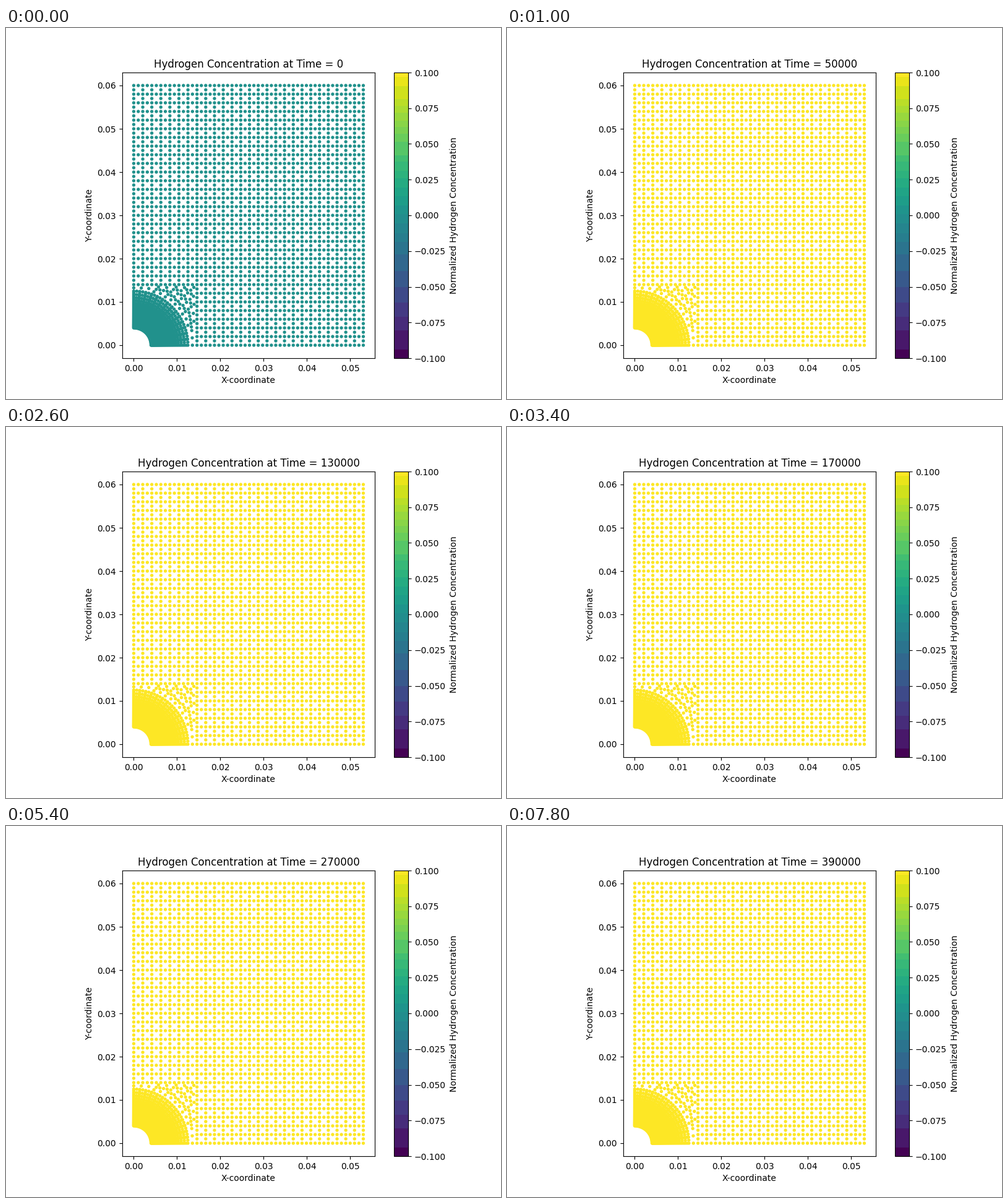
Recreate the animation shown at these times as a matplotlib script. Size 800 px wide and 600 px high, loop 8 s.

```python
import numpy as np
import matplotlib.pyplot as plt
from matplotlib.animation import FuncAnimation
from matplotlib.cm import ScalarMappable
from matplotlib.colors import ListedColormap, Normalize

FRAMES, INTERVAL, STEP = 40, 200, 10000
HOLE, RING = 0.004, 0.0125      # radii of the hole and of the fine mesh
BX, BY = 0.0146, 0.014          # block meshed around the hole
W, H = 0.053, 0.06              # whole plate
SIDE = 14                       # half-steps along each side of the block


def edge_nodes(ni, nj):
    """Half-step indices of 8-node quads (no centre nodes)."""
    i, j = np.meshgrid(np.arange(ni), np.arange(nj), indexing="ij")
    keep = (i % 2 == 0) | (j % 2 == 0)
    return i[keep], j[keep]


def plate_nodes():
    xs = np.r_[np.linspace(0, BX, 15), np.linspace(BX, W, 39)[1:]]
    ys = np.linspace(0, H, 61)
    i, j = edge_nodes(len(xs), len(ys))
    pts = np.c_[xs[i], ys[j]]
    outside = (pts[:, 0] > BX - 1e-9) | (pts[:, 1] > BY - 1e-9)
    return pts[outside]


def ray_directions():
    angle = np.arange(2 * SIDE + 1) * np.pi / (4 * SIDE)
    return np.c_[np.cos(angle), np.sin(angle)]


def ring_nodes(n_rad=20, growth=1.08):
    """Fine polar mesh, graded towards the hole."""
    corners = np.r_[0, np.cumsum(growth ** np.arange(n_rad))]
    half = np.arange(2 * n_rad + 1) / 2
    t = np.interp(half, np.arange(n_rad + 1), corners / corners[-1])
    radius = HOLE + (RING - HOLE) * t
    rays = ray_directions()
    i, j = edge_nodes(len(radius), len(rays))
    return radius[i][:, None] * rays[j]


def corner_nodes(spacing=0.001):
    """Coarse mesh between the ring and the block's straight sides."""
    pts = []
    for k, ray in enumerate(ray_directions()):
        start = RING * ray
        end = np.array([BX * min(1, 2 - k / SIDE), BY * min(1, k / SIDE)])
        cells = max(1, round(np.hypot(*(end - start)) / (2 * spacing)))
        t = np.arange(0, 2 * cells + 1, 1 + k % 2) / (2 * cells)
        pts.append(start + t[:, None] * (end - start))
    return np.vstack(pts)


def banded_viridis():
    edges = np.array([72, 79, 94, 115, 126, 137, 149, 160, 171, 183, 206, 217,
                      231, 244, 258, 272, 287, 302, 316, 331, 347, 366, 394,
                      418, 443, 467, 489, 519, 534])
    edges = (534 - edges[::-1]) / 462
    mids = (edges[1:] + edges[:-1]) / 2
    mids[0], mids[-1] = 0, 1
    v = (np.arange(256) + 0.5) / 256
    return ListedColormap(plt.get_cmap("viridis")(mids[np.searchsorted(edges, v) - 1]))


nodes = np.vstack([plate_nodes(), ring_nodes(), corner_nodes()])
nodes = np.unique(np.round(nodes, 8), axis=0)
norm = Normalize(-0.1, 0.1)

fig, ax = plt.subplots(figsize=(8, 6), dpi=100)
dots = ax.scatter(nodes[:, 0], nodes[:, 1], c=np.zeros(len(nodes)), s=8,
                  cmap="viridis", norm=norm)
fig.colorbar(ScalarMappable(norm, banded_viridis()), ax=ax,
             label="Normalized Hydrogen Concentration")
ax.set_aspect("equal")
ax.set_xlabel("X-coordinate")
ax.set_ylabel("Y-coordinate")
title = ax.set_title("Hydrogen Concentration at Time = 0")


def update(n):
    dots.set_array(np.full(len(nodes), 1.0 if n else 0.0))
    title.set_text(f"Hydrogen Concentration at Time = {n * STEP}")
    return dots, title


anim = FuncAnimation(fig, update, frames=FRAMES, interval=INTERVAL,
                     repeat=True, repeat_delay=0, blit=False)
plt.show()
```
